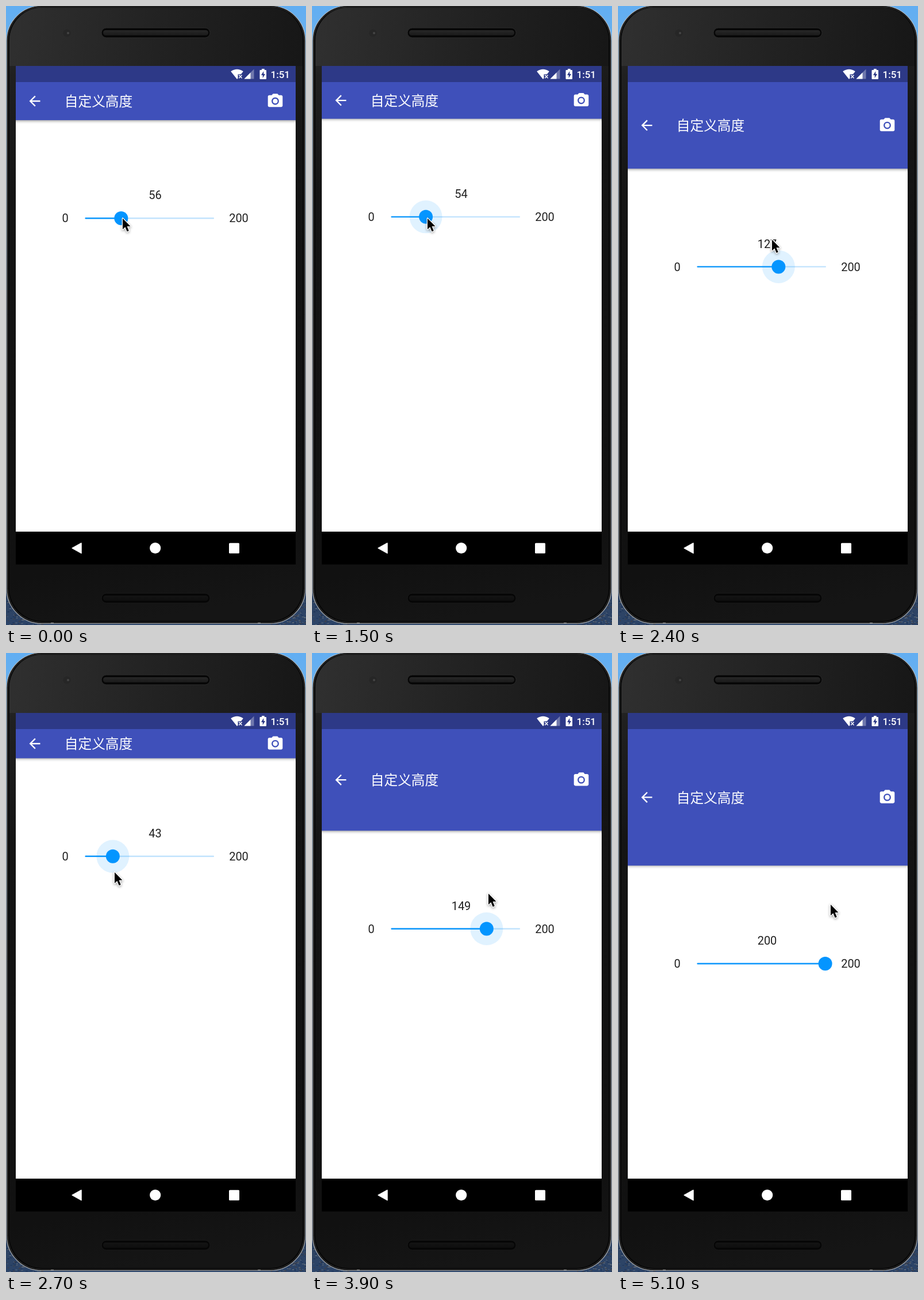
An HTML page with a canvas that plays this animation: 522x1074 px, repeating every 6000 ms.

```html
<!DOCTYPE html>
<html lang="zh">
<head>
<meta charset="utf-8">
<title>Height slider</title>
<style>
html, body { margin: 0; width: 100%; height: 100%; overflow: hidden; background: #111; }
canvas { display: block; width: 522px; height: 1074px; }
</style>
</head>
<body>
<canvas id="stage" width="522" height="1074"></canvas>
<script>
const W = 522, H = 1074, LOOP = 6000;
const ctx = document.getElementById('stage').getContext('2d');
const DP = 1.186;
const screen = { x: 17, y: 104, w: 487, h: 865 };

// Drag steps: start time, value, pointer x, pointer y, pressed
const drag = [
  [0, 56, 202, 367, 0],
  [1200, 56, 202, 367, 1],
  [1500, 54, 200, 367, 1],
  [1800, 100, 251, 386, 1],
  [2100, 142, 292, 404, 1],
  [2400, 127, 267, 404, 1],
  [2700, 43, 188, 379, 1],
  [3000, 100, 252, 395, 1],
  [3300, 156, 314, 411, 1],
  [3600, 152, 309, 414, 1],
  [3900, 149, 306, 416, 1],
  [4200, 172, 332, 422, 1],
  [4500, 196, 359, 430, 1],
  [4800, 200, 369, 435, 1],
  [5100, 200, 369, 435, 0]
];

const arrowIcon = new Path2D('M20 11H7.83l5.59-5.59L12 4l-8 8 8 8 1.41-1.41L7.83 13H20v-2z');
const cameraIcon = new Path2D('M9 2L7.17 4H4c-1.1 0-2 .9-2 2v12c0 1.1.9 2 2 2h16c1.1 0 2-.9 2-2V6c0-1.1-.9-2-2-2h-3.17L15 2H9z' +
  'm3 15c-2.76 0-5-2.24-5-5s2.24-5 5-5 5 2.24 5 5-2.24 5-5 5z' +
  'M8.8 12a3.2 3.2 0 1 0 6.4 0a3.2 3.2 0 1 0-6.4 0z');
const pointer = new Path2D('M0 0V19L4.4 14.9L7.6 22.8L10.8 21.4L7.5 13.8H13.5Z');

function rect(c, x, y, w, h, fill) {
  c.fillStyle = fill;
  c.fillRect(x, y, w, h);
}
function round(c, x, y, w, h, r, fill, stroke, lw = 1) {
  c.beginPath();
  c.roundRect(x, y, w, h, r);
  if (fill) { c.fillStyle = fill; c.fill(); }
  if (stroke) { c.strokeStyle = stroke; c.lineWidth = lw; c.stroke(); }
}
function disc(c, x, y, r, fill) {
  c.beginPath();
  c.arc(x, y, r, 0, Math.PI * 2);
  c.fillStyle = fill;
  c.fill();
}
function poly(c, pts, fill) {
  c.beginPath();
  pts.forEach(([x, y]) => c.lineTo(x, y));
  c.closePath();
  c.fillStyle = fill;
  c.fill();
}
function fade(c, x0, y0, x1, y1, ...stops) {
  const g = c.createLinearGradient(x0, y0, x1, y1);
  stops.forEach(([p, col]) => g.addColorStop(p, col));
  return g;
}
function text(c, str, x, y, font, fill, align = 'center') {
  c.font = font;
  c.fillStyle = fill;
  c.textAlign = align;
  c.fillText(str, x, y);
}
function icon(path, x, y, scale) {
  ctx.save();
  ctx.translate(x - 12 * scale, y - 12 * scale);
  ctx.scale(scale, scale);
  ctx.fillStyle = '#fff';
  ctx.fill(path, 'evenodd');
  ctx.restore();
}

function drawDesktop(c) {
  rect(c, 0, 0, W, H, fade(c, 0, 0, 0, H, [0, '#62aef2'], [0.12, '#70b4ea'], [0.5, '#3d4a5c'], [0.94, '#304360'], [1, '#2c4468']));
  let seed = 7;
  const rnd = () => (seed = seed * 16807 % 2147483647) / 2147483647;
  for (let i = 0; i < 420; i++) {
    const x = rnd() < 0.5 ? rnd() * 70 : W - rnd() * 70;
    rect(c, x, 1030 + rnd() * 44, 1 + rnd() * 3, 1, ['#1b3257', '#66707c', '#443f40'][i % 3]);
  }
}

function drawSpeaker(c, y, top, bottom, rim) {
  round(c, 166, y, 189, 17, 8.5, '#060606', rim);
  round(c, 169, y + 4, 183, 9, 4.5, fade(c, 0, y + 4, 0, y + 13, [0, top], [1, bottom]));
}

function drawPhone(c) {
  round(c, 1, -0.5, 520, 1072, 61, '#0a0a0a', '#aeb2b6', 1.2);
  round(c, 3, 1.5, 516, 1068, 59, '#080808', '#3a3a3a', 1);
  round(c, 6, 3, 510, 1064, 57, fade(c, 0, 0, 190, 1074, [0, '#303030'], [0.11, '#202020'], [0.3, '#141414'], [0.9, '#111'], [1, '#151515']));
  c.save();
  c.beginPath();
  c.rect(6, 0, 510, 104);
  c.clip();
  round(c, 6, 3, 510, 1064, 57, fade(c, 20, 0, 516, 60, [0, '#2f2f2f'], [0.5, '#222'], [1, '#171717']));
  c.restore();
  rect(c, 78, 1069, 5, 2, '#555');
  rect(c, 438, 1069, 5, 2, '#555');
  drawSpeaker(c, 38, '#272727', '#1a1a1a', '#2b2b2b');
  drawSpeaker(c, 1019, '#141414', '#0e0e0e', '#1a1a1a');
  disc(c, 106, 47, 6.5, '#262626');
  disc(c, 108, 47, 2, '#454545');
}

function drawStatus(c) {
  rect(c, screen.x, screen.y, screen.w, 28, '#2d3987');
  c.beginPath();
  c.moveTo(402, 127);
  c.lineTo(391.2, 113.5);
  c.quadraticCurveTo(402, 106, 412.8, 113.5);
  c.lineTo(408.8, 118.5);
  c.lineTo(403.5, 118.5);
  c.lineTo(403.5, 125.2);
  c.closePath();
  c.fillStyle = '#fff';
  c.fill();
  c.strokeStyle = '#fff';
  c.lineWidth = 1.5;
  c.beginPath();
  c.moveTo(405.3, 119.8); c.lineTo(410.5, 125.2);
  c.moveTo(410.5, 119.8); c.lineTo(405.3, 125.2);
  c.stroke();
  poly(c, [[414.5, 126.5], [431.5, 126.5], [431.5, 109.5]], 'rgba(255,255,255,.32)');
  poly(c, [[414.5, 126.5], [425.5, 126.5], [425.5, 115.5]], '#fff');
  round(c, 441.5, 111, 11.5, 16, 1, '#fff');
  rect(c, 445, 109, 4.7, 3, '#fff');
  poly(c, [[448.3, 113], [444, 120], [446.7, 120], [446.7, 125], [451, 118], [448.3, 118]], '#2d3987');
  text(c, '1:51', 494, 125, '500 17px Roboto, sans-serif', '#fff', 'right');
}

function drawNav(c) {
  rect(c, screen.x, 912, screen.w, 57, '#000');
  c.lineJoin = 'round';
  c.strokeStyle = '#fff';
  c.lineWidth = 1.5;
  poly(c, [[115.2, 940.7], [131, 932], [131, 949.4]], '#fff');
  c.stroke();
  disc(c, 259.7, 940.5, 9.6, '#fff');
  round(c, 388, 931.8, 18, 18, 1.5, '#fff');
}

const back = document.createElement('canvas');
back.width = W;
back.height = H;
const bc = back.getContext('2d');
drawDesktop(bc);
drawPhone(bc);
rect(bc, screen.x, screen.y, screen.w, screen.h, '#fff');
drawNav(bc);

function drawBar(bottom) {
  const mid = (132 + bottom) / 2;
  ctx.save();
  ctx.beginPath();
  ctx.rect(screen.x, 132, screen.w, 780);
  ctx.clip();
  ctx.shadowColor = 'rgba(0,0,0,.42)';
  ctx.shadowBlur = 5;
  ctx.shadowOffsetY = 1.5;
  rect(ctx, 10, 120, 500, bottom - 120, '#3f50ba');
  ctx.restore();
  icon(arrowIcon, 50, mid, DP);
  icon(cameraIcon, 468.5, mid, 1.28);
  text(ctx, '自定义高度', 101.8, mid + 9.2, '23.7px "Noto Sans CJK SC", "Noto Sans CJK", sans-serif', '#fff', 'left');
}

function drawSlider(value, y, pressed) {
  const x = 138 + value * 1.113;
  const font = '20px Roboto, sans-serif', ink = '#202020';
  const base = Math.round(y + 7.1);
  round(ctx, 137.5, y - 1.2, 224.5, 2.4, 1, '#c2e3fd');
  round(ctx, 137.5, y - 1.2, x - 137.5, 2.4, 1, '#0f98fc');
  if (pressed) disc(ctx, x, y, 28.5, 'rgba(4,149,255,.12)');
  disc(ctx, x, y, 12, '#0495ff');
  text(ctx, '0', 103, base, font, ink);
  text(ctx, '200', 405, base, font, ink);
  text(ctx, String(value), 259.5, base - 40, font, ink);
}

function drawPointer(x, y) {
  ctx.save();
  ctx.translate(x + 1, y + 1.5);
  ctx.lineJoin = 'round';
  ctx.lineWidth = 2.6;
  ctx.strokeStyle = '#fff';
  ctx.shadowColor = 'rgba(0,0,0,.4)';
  ctx.shadowBlur = 4;
  ctx.shadowOffsetY = 1.5;
  ctx.stroke(pointer);
  ctx.shadowColor = 'transparent';
  ctx.fillStyle = '#000';
  ctx.fill(pointer);
  ctx.restore();
}

const start = performance.now();
function draw() {
  const t = Math.max(0, performance.now() - start) % LOOP;
  const [, value, px, py, pressed] = drag.findLast(s => s[0] <= t);
  const bottom = 131.6 + value * DP;
  ctx.drawImage(back, 0, 0);
  drawBar(bottom);
  drawStatus(ctx);
  drawSlider(value, bottom + 170.2, pressed);
  drawPointer(px, py);
  requestAnimationFrame(draw);
}
draw();
</script>
</body>
</html>
```
